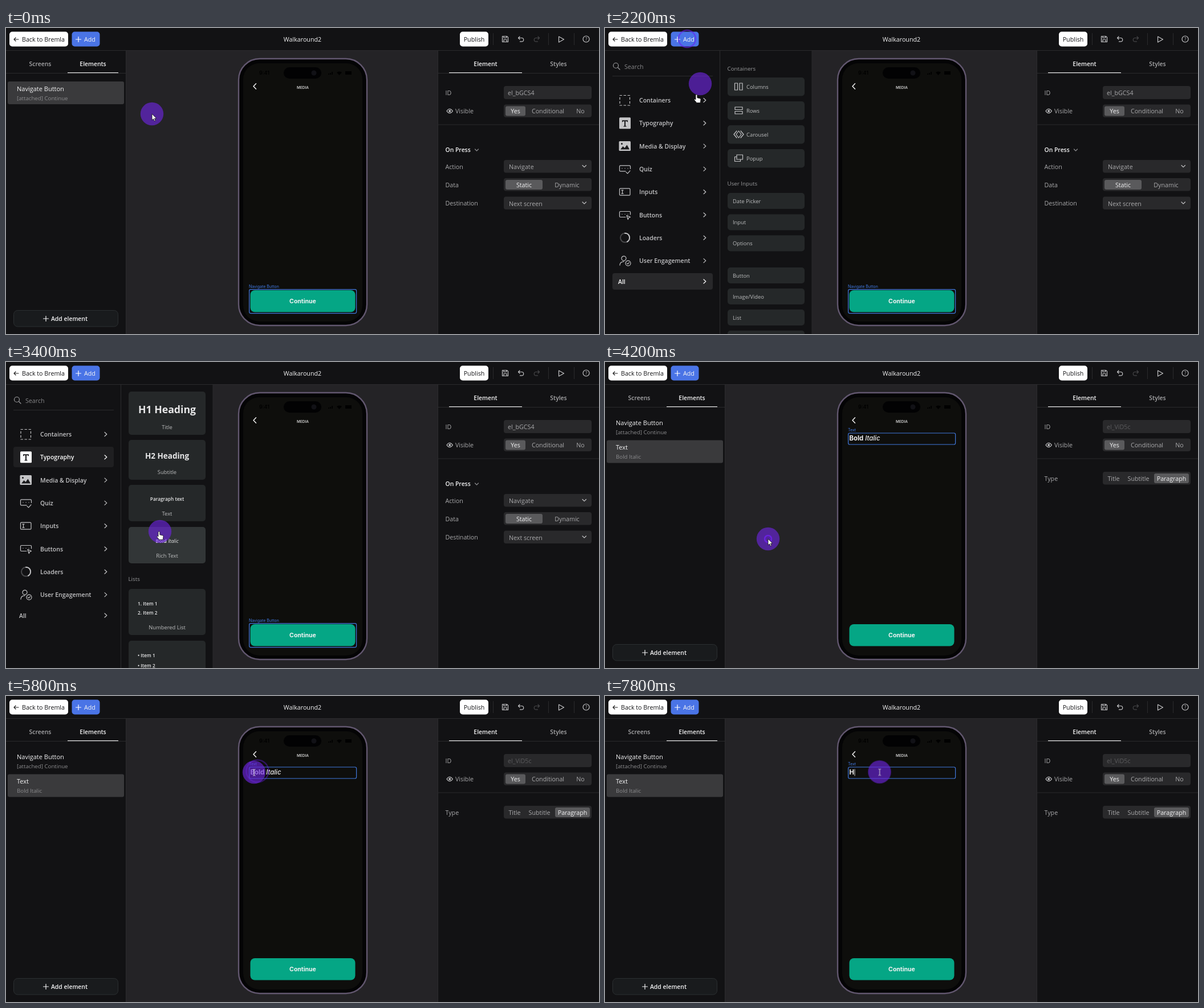
An HTML page for the animation above (8000 ms loop, 1040 by 538 pixels).

```html
<!DOCTYPE html>
<html lang="en">
<head>
<meta charset="utf-8">
<title>Screen builder</title>
<style>
html, body { margin: 0; width: 100%; height: 100%; overflow: hidden; background: #121214; }
svg { display: block; width: 1040px; height: 538px; }
text { font: 10.7px "Open Sans", "Noto Sans", sans-serif; fill: #a9a9ab; white-space: pre; }
.mid { text-anchor: middle; }
.semi { font-weight: 600; font-size: 10.4px; }
.white { fill: #f4f4f5; }
.dark { fill: #141416; }
.sub { font-size: 9.7px; fill: #8b8b8d; }
.card { font-size: 9.4px; fill: #bcbdbe; }
.head { font-size: 9.8px; fill: #98999b; }
.app { font-family: Inter, "Noto Sans", sans-serif; }
.tag { font-size: 7px; fill: #4079e2; }
.rule { fill: #2b2b2d; }
.field { fill: #29292b; }
.pill { fill: #5a5a5c; }
.tile { fill: #252829; }
.line { fill: none; stroke: #c4c4c6; stroke-width: 1.2; stroke-linecap: round; stroke-linejoin: round; }
.pick { fill: none; stroke: #4078dd; stroke-width: 1.2; }
.row text { fill: currentColor; font-weight: 600; font-size: 10.5px; }
.row { color: #c4c4c6; }
.row .line { stroke: currentColor; }

.anim { animation: 8s step-end -20ms infinite; }
.before { animation-name: before; }
.after { animation-name: after; }
.menu { animation-name: menu; }
.all { animation-name: all; }
.typo { animation-name: typo; }
.hot { animation-name: hot; }
.cool { animation-name: cool; }
.rich { animation-name: rich; }
.arrow { animation-name: arrow; }
.hand { animation-name: hand; }
.beam { animation-name: beam; }
.phrase { animation-name: phrase; }
.select { animation-name: select; }
.caret { animation-name: caret; }
.typed { animation-name: typed; }
.move { animation-name: move; }
.lag { animation-name: lag; }
.ring { animation: ring 8s step-end infinite; fill: none; stroke: #6a1ff0; stroke-width: 2.5; }

@keyframes before { 0% { visibility: visible } 52.5%, 100% { visibility: hidden } }
@keyframes after { 0% { visibility: hidden } 52.5%, 100% { visibility: visible } }
@keyframes menu { 0%, 52.5%, 100% { visibility: hidden } 22.5% { visibility: visible } }
@keyframes all { 0%, 30%, 100% { visibility: hidden } 22.5% { visibility: visible } }
@keyframes typo { 0%, 52.5%, 100% { visibility: hidden } 30% { visibility: visible } }
@keyframes hot { 0% { color: #c4c4c6 } 30%, 100% { color: #fff } }
@keyframes cool { 0% { color: #fff } 30%, 100% { color: #c4c4c6 } }
@keyframes rich { 0% { fill: #252829 } 42.5%, 100% { fill: #323637 } }
@keyframes arrow { 0%, 52.5% { visibility: visible } 15%, 65%, 100% { visibility: hidden } }
@keyframes hand { 0%, 52.5%, 100% { visibility: hidden } 15% { visibility: visible } }
@keyframes beam { 0% { visibility: hidden } 65%, 100% { visibility: visible } }
@keyframes phrase { 0%, 87.5%, 100% { visibility: hidden } 52.5% { visibility: visible } }
@keyframes select {
  0%, 87.5%, 100% { width: 0 }
  77.5% { width: 0; animation-timing-function: steps(3) }
  85% { width: 55px }
}
@keyframes caret { 0%, 92.5%, 100% { visibility: hidden } 87.5% { visibility: visible } }
@keyframes typed { 0% { visibility: hidden } 97.5%, 100% { visibility: visible } }
@keyframes move {
  0% { transform: translate(256px, 151px); animation-timing-function: steps(2) }
  5% { transform: translate(235px, 126px); animation-timing-function: steps(2) }
  10% { transform: translate(165px, 43px); animation-timing-function: steps(2) }
  15% { transform: translate(145px, 19px) }
  25% { transform: translate(152px, 48px) }
  27.5% { transform: translate(167px, 98px) }
  30% { transform: translate(142px, 150px) }
  32.5% { transform: translate(124px, 173px) }
  37.5% { transform: translate(145px, 189px); animation-timing-function: steps(2) }
  42.5% { transform: translate(270px, 298px) }
  45% { transform: translate(286px, 311px) }
  62.5% { transform: translate(370px, 215px) }
  65% { transform: translate(441px, 132px) }
  72.5% { transform: translate(435px, 134px) }
  77.5% { transform: translate(435px, 134px); animation-timing-function: steps(3) }
  85%, 100% { transform: translate(481.5px, 133.5px) }
}
@keyframes lag {
  0%, 30%, 100% { transform: none }
  25% { transform: translate(2px, 12px) }
  27.5% { transform: translate(-5px, 19px) }
}
@keyframes ring {
  0% { r: 6px; opacity: .95; animation-timing-function: steps(5) }
  12.5%, 100% { r: 28.5px; opacity: 0 }
}
</style>
</head>
<body>
<svg viewBox="0 0 1040 538">
  <rect width="1040" height="538" fill="#121214"/>
  <rect x="210" y="40" width="547" height="498" fill="#242326"/>
  <rect class="rule" x="210" y="40" width="1" height="498"/>
  <rect class="rule" x="757" y="40" width="1" height="498"/>

  <!-- phone -->
  <g>
    <rect x="408" y="54" width="225" height="469" rx="37" fill="#040405" stroke="#62576f" stroke-width="2.4"/>
    <rect x="416" y="62" width="209" height="454" rx="28" fill="#0e0e0c"/>
    <rect x="487" y="69" width="66" height="20" rx="10" fill="#020203"/>
    <circle cx="540" cy="79" r="4.5" fill="#111116"/>
    <text class="app mid" x="453" y="82" style="font-size:9px;font-weight:600;fill:#010101">9:41</text>
    <path d="M565 82v-2h2v2zM568 82v-3h2v3zM571 82v-5h2v5zM580 78q4.500-3 9 0l-4.500 5zM595 76h11v6h-11z" fill="#010101"/>
    <path class="line" d="M438.500 97.800l-4.500 4.700 4.500 4.700" style="stroke:#f2f2f2;stroke-width:1.5"/>
    <text class="app mid" x="520.500" y="107.400" style="font-size:6.5px;font-weight:600;fill:#cfcfcf">MEDIA</text>
    <rect x="428.500" y="461" width="184" height="38.500" rx="8" fill="#05a685"/>
    <text class="app mid white" x="520.500" y="483.500" style="font-size:10.5px;font-weight:700">Continue</text>
    <g class="anim before">
      <text class="app tag" x="426" y="457">Navigate Button</text>
      <rect class="pick" x="426.600" y="459.600" width="188" height="42" rx="2.500"/>
    </g>
    <g class="anim after">
      <text class="app tag" x="426" y="122">Text</text>
      <rect class="pick" x="426.600" y="125" width="188" height="20" rx="2.500"/>
    </g>
    <rect class="anim select" x="429" y="127" width="0" height="16" fill="#2f5fc4"/>
    <text class="app anim phrase white" x="428.500" y="138" style="font-size:11.3px"><tspan font-weight="700">Bold</tspan> <tspan font-style="italic" font-weight="500">Italic</tspan></text>
    <rect class="anim caret" x="429" y="128.500" width="1" height="12" fill="#eee"/>
    <g class="anim typed">
      <text class="app white" x="428.500" y="138" style="font-size:11.3px;font-weight:700">H</text>
      <rect x="437.500" y="128.500" width="1" height="12" fill="#ccc"/>
    </g>
  </g>

  <!-- element list -->
  <g>
    <text class="semi mid" x="60" y="67">Screens</text>
    <text class="semi mid white" x="152.500" y="67">Elements</text>
    <rect class="rule" y="79" width="210" height="1"/>
    <rect x="108" y="78" width="89" height="1.200" fill="#e6e6e6"/>
    <rect class="anim before" x="3" y="94" width="204" height="40" rx="3" fill="#3a3a3c"/>
    <text class="white" x="19" y="111" style="font-size:11px">Navigate Button</text>
    <text class="sub" x="19" y="127">[attached] Continue</text>
    <g class="anim after">
      <rect x="3" y="137.500" width="204" height="40" rx="3" fill="#3a3a3c"/>
      <text class="white" x="19" y="154" style="font-size:11px">Text</text>
      <text class="sub" x="19" y="170">Bold Italic</text>
    </g>
    <rect x="13.500" y="496.500" width="183" height="28.500" rx="7" fill="#191b1d" stroke="#2b2f31"/>
    <path class="line" d="M65.500 511h9M70 506.500v9" style="stroke:#f4f4f5"/>
    <text class="semi white" x="79" y="515">Add element</text>
  </g>

  <!-- inspector -->
  <g id="inspector">
    <text class="semi mid white" x="841" y="67">Element</text>
    <text class="semi mid" x="969" y="67">Styles</text>
    <rect class="rule" x="757" y="79" width="283" height="1"/>
    <rect x="777" y="78" width="128" height="1.200" fill="#e6e6e6"/>
    <rect class="rule" x="757" y="169.500" width="283" height="1"/>
    <text x="770.500" y="118">ID</text>
    <rect class="field" x="873" y="102" width="154" height="23" rx="4"/>
    <text class="anim before" x="880" y="118">el_bGCS4</text>
    <text class="anim after" x="880" y="118" style="fill:#5b5b5d">el_ViD5c</text>
    <path class="line" d="M773 146q5-7.500 10.500 0q-5.500 7.500-10.500 0z"/>
    <circle cx="778.200" cy="146" r="2" fill="#c4c4c6"/>
    <text x="788" y="150">Visible</text>
    <g id="visible"></g>
    <g class="anim before">
      <text class="semi white" x="770.500" y="218">On Press</text>
      <path class="line" d="M822.500 213l3 3 3-3" style="stroke:#8b8b8d"/>
      <text x="770.500" y="248">Action</text>
      <text x="770.500" y="280">Data</text>
      <text x="770.500" y="312">Destination</text>
      <g id="press"></g>
    </g>
    <g class="anim after">
      <text x="770.500" y="209">Type</text>
      <g id="type"></g>
    </g>
  </g>

  <!-- add menu -->
  <g class="anim menu">
    <rect y="40" width="363" height="498" fill="#121214"/>
    <rect class="rule" x="201" y="40" width="1" height="498"/>
    <rect class="rule" x="362.500" y="40" width="1" height="498"/>
    <circle class="line" cx="19" cy="66" r="4.500" style="stroke:#9a9a9c"/>
    <path class="line" d="M22.500 69.500l3.500 3.500" style="stroke:#9a9a9c"/>
    <text x="34" y="72" style="fill:#858587">Search</text>
    <rect class="rule" x="13" y="84" width="176" height="1"/>
    <rect class="anim typo" x="13" y="149" width="176" height="36" rx="4" fill="#1f1f21"/>
    <rect class="anim all" x="13" y="431" width="176" height="29" rx="4" fill="#28282a"/>
    <g id="rows"></g>
  </g>
  <g class="anim all" id="everything"></g>
  <g class="anim typo" id="typography"></g>

  <!-- toolbar -->
  <rect width="1040" height="39" fill="#121214"/>
  <rect class="rule" y="39" width="1040" height="1"/>
  <rect x="6" y="6.500" width="103" height="26" rx="5" fill="#fff"/>
  <path class="line" d="M22 20h-8M17 17l-3 3 3 3" style="stroke:#222"/>
  <text class="dark" x="28" y="24">Back to Bremla</text>
  <rect x="115.500" y="6.500" width="49" height="26" rx="5" fill="#4a74e6"/>
  <path class="line" d="M122.500 20h9M127 15.500v9" style="stroke:#fff"/>
  <text class="white" x="137" y="24">Add</text>
  <text class="white mid" x="520" y="24">Walkaround2</text>
  <rect x="796" y="6.500" width="50" height="26" rx="5" fill="#fff"/>
  <text class="dark mid" x="821" y="24">Publish</text>
  <path class="rule" d="M854 9h1v21h-1zM951 9h1v21h-1zM996 9h1v21h-1z"/>
  <path class="line" d="M870.500 14.500h8l2 2v8h-10zM873 14.500v3h4.500v-3M873 24.500v-4h5v4"/>
  <path class="line" d="M901 15l-2.500 2.500 2.500 2.500M898.500 17.500h6a3.200 3.200 0 0 1 0 6.400h-3"/>
  <path class="line" d="M933 15l2.500 2.500-2.500 2.500M935.500 17.500h-6a3.200 3.200 0 0 0 0 6.400h3" style="stroke:#464648"/>
  <path class="line" d="M969.500 15l9 5-9 5z"/>
  <circle class="line" cx="1017.500" cy="19.500" r="5.500"/>
  <text class="mid" x="1017.500" y="22.800" style="font-size:8.5px">?</text>

  <!-- pointer -->
  <circle class="ring" cx="144" cy="19" style="animation-delay:-6.22s"/>
  <circle class="ring" cx="286" cy="311" style="animation-delay:-3.82s"/>
  <circle class="ring" cx="441" cy="132" style="animation-delay:-2.82s"/>
  <g class="anim move">
    <circle r="20.200" fill="#6c26da" fill-opacity=".65"/>
    <g class="anim lag" stroke="#141414" stroke-width=".8" fill="#fff">
      <path class="anim arrow" d="M0 0v11l2.600-2.300 1.700 3.900 1.800-.8-1.700-3.800h3.500z"/>
      <path class="anim hand" d="M-3 1.500a1.400 1.400 0 0 1 2.800 0v4.200l5 1.200q1.500.5 1.200 2l-.9 5.600h-6.300l-4.100-5q-.6-1.300.7-1.500l1.600 1z"/>
      <path class="anim beam" d="M-2 -5h1.500l.7.700.7-.7h1.500M.2 -4.300v9.600M-2 6h1.500l.7-.7.7.7h1.500" fill="none" stroke="#ddd" stroke-width="1"/>
    </g>
  </g>
</svg>
<script>
const put = (id, html) => { document.getElementById(id).innerHTML = html; };
const text = (x, y, s, cls = "", style = "") => `<text class="${cls}" x="${x}" y="${y}" style="${style}">${s}</text>`;
const rect = (cls, x, y, w, h, rx = 4) => `<rect class="${cls}" x="${x}" y="${y}" width="${w}" height="${h}" rx="${rx}"/>`;
const line = d => `<path class="line" d="${d}"/>`;

// Segmented control: options are [label, centre]; the active one gets a pill.
const segments = (y, options, pillX, pillW, active) =>
  rect("field", 873, y, 154, 22.5) + rect("pill", pillX, y + 3, pillW, 17, 3) +
  options.map(([s, x], i) => text(x, y + 15.5, s, "mid" + (i === active ? " white" : ""))).join("");

const dropdown = (y, s) =>
  rect("field", 873, y, 154, 22.5) + text(882, y + 16, s) + line(`M1011 ${y + 9.500}l3.200 3.200 3.200-3.200`);

put("visible", segments(134.5, [["Yes", 893.5], ["Conditional", 950.5], ["No", 1007.5]], 876, 35, 0));
put("press", dropdown(232, "Navigate") +
  segments(264, [["Static", 908.5], ["Dynamic", 984]], 876, 65, 0) + dropdown(296.5, "Next screen"));
put("type", segments(193, [["Title", 892], ["Subtitle", 935.5], ["Paragraph", 993.5]], 963, 61, 2));

// Icons are drawn around (35, 0).
const bubble = line("M36 4h-9q-1.500 0-1.500-1.500v-7q0-1.500 1.500-1.500h16q1.500 0 1.500 1.500v4M30-1h.1M35-1h.1M40-1h.1");
const rows = [
  ["Containers", '<rect class="line" x="26" y="-8.500" width="17.500" height="17.500" stroke-dasharray="3.500 3.500"/>'],
  ["Typography", '<rect x="25" y="-10" width="20" height="20" rx="1.500" fill="currentColor"/><path d="M30-5h10v3h-1.200l-.6-1.300h-2.200v8l1.500.4v1h-5v-1l1.500-.4v-8h-2.200l-.6 1.300h-1.200z" fill="#1a1a1c"/>'],
  ["Media &amp; Display", '<rect x="24.500" y="-8.500" width="20.500" height="17" rx="1.500" fill="currentColor"/><path d="M27 6l4.500-5.500 3 3 4-5.500 4.500 8z" fill="#1a1a1c"/><circle cx="29.500" cy="-4" r="1.500" fill="#1a1a1c"/>'],
  ["Quiz", bubble + line("M37 5.500l2.500 2.500 4.500-5")],
  ["Inputs", '<rect class="line" x="25.500" y="-6" width="18.500" height="12" rx="1.500"/>' + line("M29-3h3M30.500-3v6M29 3h3")],
  ["Buttons", bubble + line("M38 1l6.500 3-3 1-1.200 3.200z")],
  ["Loaders", '<circle class="line" cx="35" r="8" style="stroke:#48484a;stroke-width:2"/><path class="line" d="M35-8a8 8 0 0 1 4 15" style="stroke-width:2"/>'],
  ["User Engagement", '<circle class="line" cx="33" cy="-4" r="4"/><circle class="line" cx="40.500" cy="4.500" r="4.500"/>' + line("M26 8q0-6 7-6.500M38.500 4.500l1.500 1.500 2.500-3")]
];
const row = (y, x, s, icon, cls = "") =>
  `<g class="row ${cls}" transform="translate(0 ${y})">${icon}${text(x, 4, s)}${line("M173-3.500l3.800 3.500-3.800 3.500")}</g>`;
put("rows", rows.map(([s, icon], i) => row(127 + i * 40.3, 60, s, icon, i === 1 ? "anim hot" : "")).join("") +
  row(445.5, 23, "All", "", "anim cool"));

const layouts = [
  ["Columns", "M227.500-6h5v12h-5zM236-6h5v12h-5z"],
  ["Rows", "M228-6h13v4.500h-13zM228 1.500h13v4.500h-13z"],
  ["Carousel", "M231-6l-5 6 5 6M234.500-6l-4.500 6 4.500 6 4.500-6zM238-6l5 6-5 6"],
  ["Popup", "M231-6h10.500v8h-10.500zM231-2.500h-3.500v8h10v-3.500"]
];
const inputs = { "Date Picker": 290, Input: 327.5, Options: 364.5, Button: 421, "Image/Video": 458, List: 495, Popup: 532 };
put("everything", text(214.5, 74.5, "Containers", "head") + text(214.5, 277, "User Inputs", "head") +
  layouts.map(([s, d], i) => {
    const y = 87 + i * 42;
    return rect("tile", 215, y, 135, 32.5, 5) + `<g transform="translate(0 ${y + 16})">${line(d)}</g>` + text(248, y + 20, s, "card");
  }).join("") +
  Object.entries(inputs).map(([s, y]) => rect("tile", 215, y, 135, 28, 5) + text(224, y + 17.5, s, "card")).join(""));

const bold = size => `font-size:${size}px;font-weight:700;fill:#e8e8e9`;
const small = "font-size:8.3px;font-weight:600;fill:#e8e8e9";
const sample = (y, h, caption, body, cls = "") =>
  rect("tile " + cls, 215, y, 135, h, 5) + body + text(282.5, y + h - 10, caption, "card mid");
put("typography",
  sample(52, 76, "Title", text(282.5, 90, "H1 Heading", "mid", bold(17.7))) +
  sample(137, 70, "Subtitle", text(282.5, 170, "H2 Heading", "mid", bold(13.5))) +
  sample(216, 64, "Text", text(282.5, 244, "Paragraph text", "mid", small)) +
  sample(290, 64, "Rich Text", text(282.5, 317.5,
    '<tspan font-weight="700">Bold</tspan> <tspan font-style="italic" font-weight="400">Italic</tspan>', "mid", "font-size:8.8px;fill:#e8e8e9"), "anim rich") +
  text(214.5, 385, "Lists", "head") +
  sample(399, 81, "Numbered List", text(231, 427.5, "1. Item 1", "", small) + text(231, 443.5, "2. Item 2", "", small)) +
  sample(490, 81, "Bullet List", text(231, 519, "• Item 1", "", small) + text(231, 537, "• Item 2", "", small)));
</script>
</body>
</html>
```
